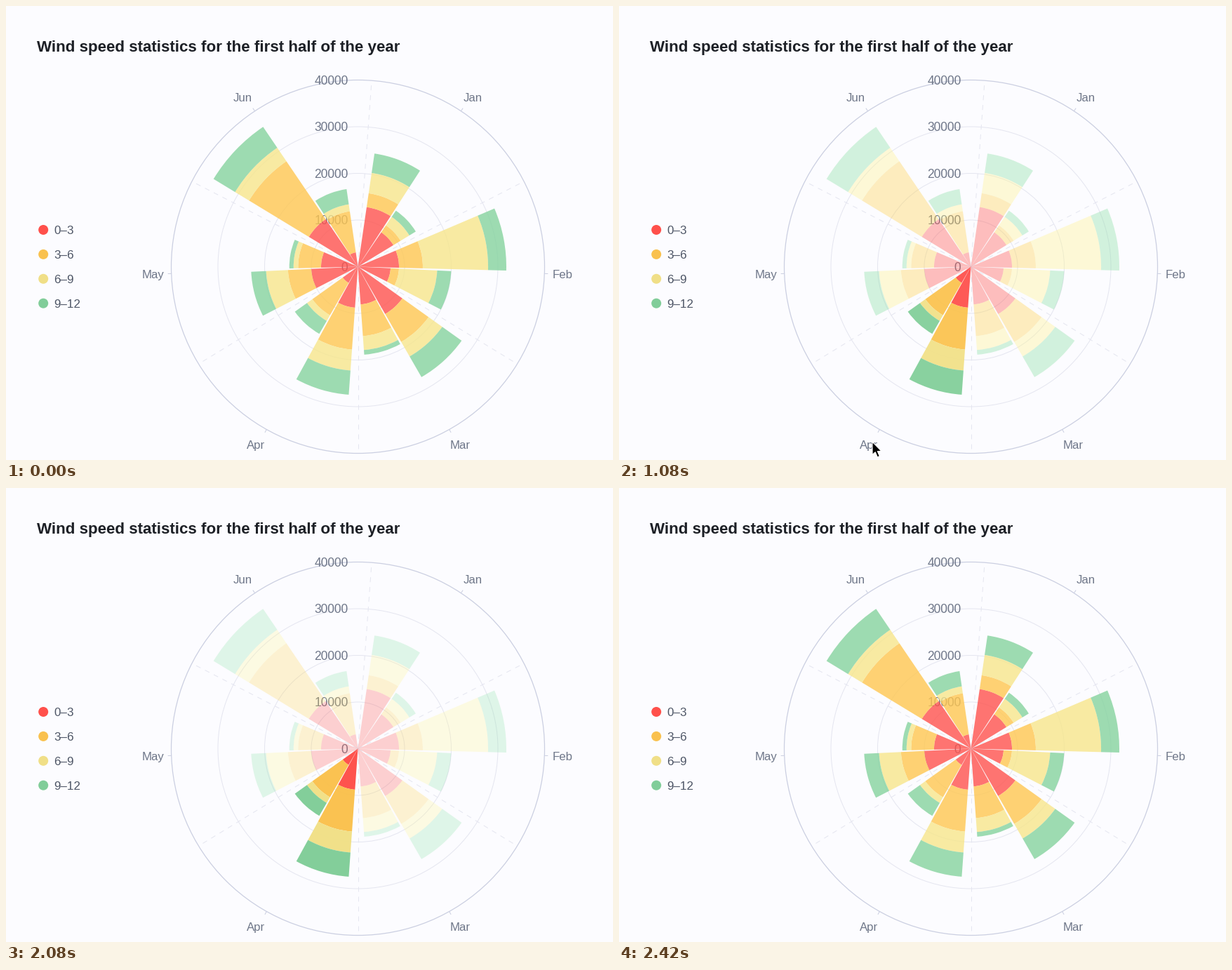
These frames come from a looping animation (865 by 647 pixels, 3.51 s). A matplotlib script:

```python
import math

import matplotlib.pyplot as plt
import numpy as np
from matplotlib.animation import FuncAnimation
from matplotlib.collections import LineCollection, PatchCollection
from matplotlib.colors import to_rgb
from matplotlib.patches import Circle, Polygon, Wedge

W, H, DPI = 865, 647, 64
PX = 72 / DPI  # points per pixel
LOOP, STEP = 3510, 10
FPS = 12  # the picture changes on a 12 fps grid

CX, CY, R = 501.5, 371.5, 266
RING = R / 4  # 10000 units
START = 4.23  # degrees clockwise from the top
SECTOR = (360 - 2 * START) / 6
GAP, BAR = 1.25, 24.57  # degrees

BG, GRID, RIM, GREY = "#fcfcff", "#e5e6f0", "#cbcfe1", "#6f7789"
SERIES = {"0–3": "#ff504b", "3–6": "#f9c14e",
          "6–9": "#f0df87", "9–12": "#81cd99"}
# Two stacked bars per month, one value per series, in hundreds
DATA = {
    "Jan": ((129, 30, 44, 42), (89, 18, 22, 16)),
    "Feb": ((88, 51, 140, 39), (70, 18, 82, 30)),
    "Mar": ((117, 69, 36, 51), (81, 68, 30, 10)),
    "Apr": ((88, 90, 45, 52), (40, 80, 14, 32)),
    "May": ((100, 50, 47, 32), (79, 49, 10, 9)),
    "Jun": ((123, 150, 35, 54), (31, 89, 15, 33)),
}
ACTIVE = "Apr"
REST, DIM = 0.8, 0.22

# Ticks of the hover: pointer enters, stops, and leaves
ENTER, STOP, NUDGE, LEAVE = 7, 13, 22, 24
TIP = np.array([361, 621])
ARROW = np.array([(0, 0), (0, 18.5), (4.2, 14.8), (7.3, 22), (10.4, 20.6),
                  (7.4, 13.6), (13, 13.4)])


def polar(angle, r):
    a = math.radians(angle)
    return CX + r * math.sin(a), CY - r * math.cos(a)


def label(x, y, text, size, color=GREY, **kw):
    ax.text(x, y, text, fontsize=size * PX, color=color,
            family="Liberation Sans", va="baseline", **kw)


def draw_lines(lines, color, **kw):
    ax.add_collection(LineCollection(lines, colors=color, lw=PX, zorder=1, **kw))


def draw_axes():
    for i in range(5):
        color, width = (RIM, 1.25) if i == 4 else (GRID, 1)
        ax.add_patch(Circle((CX, CY), RING * i, fill=False, zorder=1,
                            ec=color, lw=width * PX))
        label(487.5, CY - RING * i + 6.2, str(i * 10000), 17.5,
              ha="right", zorder=2)

    starts = [START + SECTOR * k for k in range(6)]
    draw_lines([[(CX, CY), polar(a, R)] for a in starts], GRID,
               linestyles=[(0, (7, 7))])
    mids = [a + SECTOR / 2 for a in starts]
    draw_lines([[polar(a, R), polar(a, R + 5)] for a in mids], RIM)
    for month, a in zip(DATA, mids):
        # diagonal labels lean a little towards the sides
        x, y = polar(a + 0.75 * math.sin(math.radians(2 * a)), R + 26)
        label(x, y + 6, month, 16.7, ha="center", zorder=2)


def draw_legend():
    for i, (text, color) in enumerate(SERIES.items()):
        y = 319 + 34.9 * i
        ax.add_patch(Circle((53.2, y), 7, fc=color, lw=0))
        label(68, y + 6, text, 17, "#4e5666")


def make_bars():
    wedges = []
    pad = (SECTOR - 2 * BAR - GAP) / 2
    for k, month in enumerate(DATA.values()):
        for j, values in enumerate(month):
            a = START + SECTOR * k + pad + (BAR + GAP) * j - 90
            radii = np.cumsum(values) * RING / 100
            for r, v in zip(radii, values):
                wedges.append(Wedge((CX, CY), r, a, a + BAR,
                                    width=v * RING / 100))
    bars = PatchCollection(wedges, linewidths=0, zorder=3)
    ax.add_collection(bars)
    return bars


def ease(x):
    x = min(max(x, 0), 1)
    return (1 - math.cos(math.pi * x)) / 2


def focus(tick):
    return ease((tick - 9.9) / 4.8) - ease((tick - 24.1) / 4.8)


def tint(alpha):
    """Bar colours, slightly brighter the more transparent they are."""
    rgb = np.minimum(hues * (1 + 0.15 * (1 - alpha)), 1)
    return np.hstack([rgb, alpha])


def pointer(tick):
    left = max(STOP - tick, 0) / (STOP - ENTER)
    return TIP + left ** 1.8 * np.array([17, 23]) - (3 * (tick >= NUDGE), 0)


def update(i):
    tick = math.floor((i * STEP + 5) * FPS / 1000)
    bars.set_facecolor(tint(REST + (goal - REST) * focus(tick)))
    arrow.set_visible(ENTER <= tick < LEAVE)
    arrow.set_xy(ARROW + pointer(tick))
    return bars, arrow


fig = plt.figure(figsize=(W / DPI, H / DPI), dpi=DPI, facecolor=BG)
ax = fig.add_axes([0, 0, 1, 1])
ax.set_xlim(0, W)
ax.set_ylim(H, 0)
ax.axis("off")

label(43.5, 65, "Wind speed statistics for the first half of the year",
      22.4, "#1d2026", weight="bold")
draw_axes()
draw_legend()
bars = make_bars()
hues = np.tile([to_rgb(c) for c in SERIES.values()], (2 * len(DATA), 1))
goal = np.repeat([1 if m == ACTIVE else DIM for m in DATA],
                 2 * len(SERIES))[:, None]
arrow = Polygon(ARROW, fc="black", ec="white", lw=1.2 * PX,
                joinstyle="round", zorder=5, visible=False)
ax.add_patch(arrow)

anim = FuncAnimation(fig, update, frames=LOOP // STEP, interval=STEP,
                     repeat=True, repeat_delay=0)
plt.show()
```
